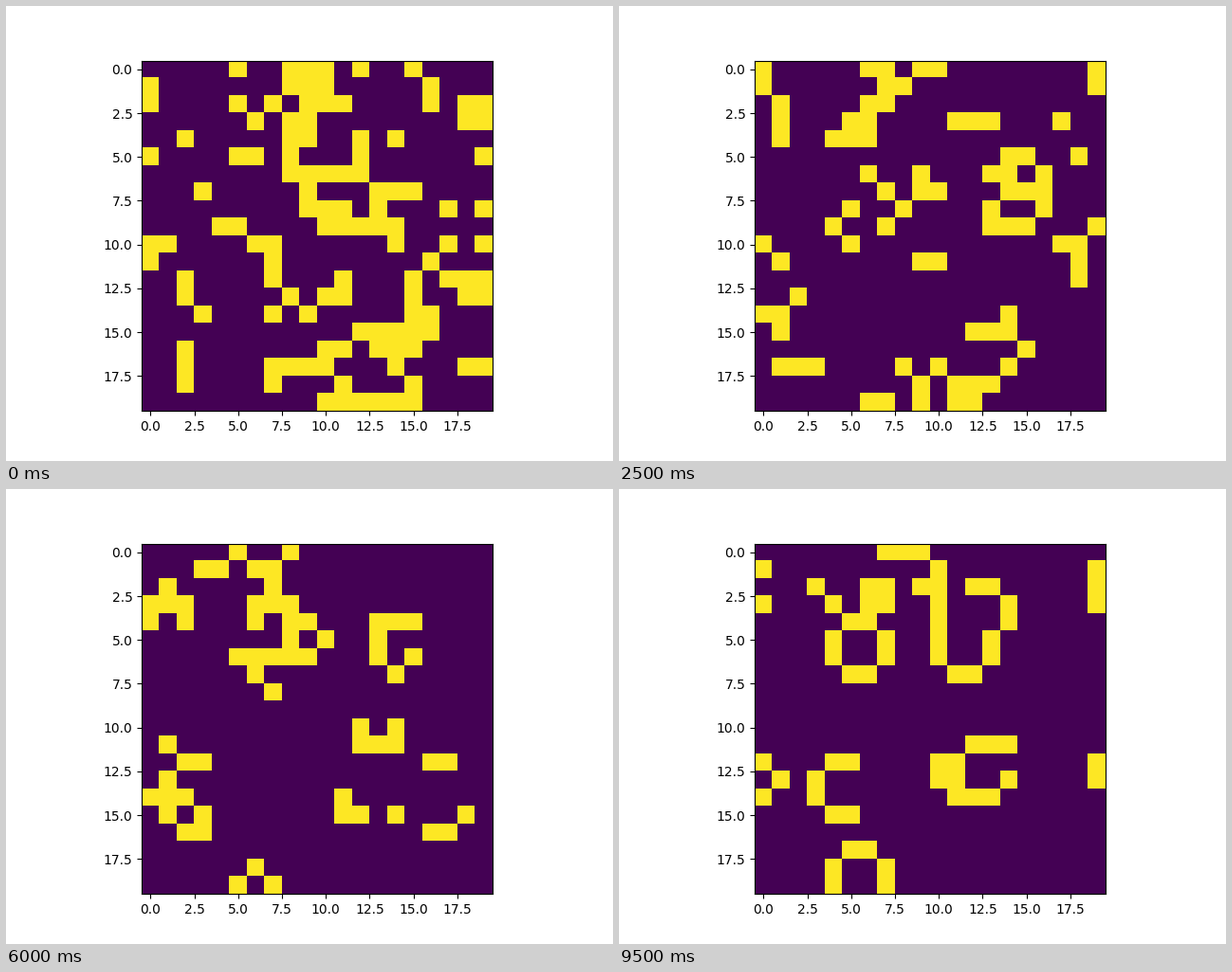
A matplotlib script that plays this animation: 640 px wide and 480 px high, repeating every 10 s.

```python
import numpy as np
import matplotlib.pyplot as plt
from matplotlib.animation import FuncAnimation

SIZE = 20
FRAMES = 20
INTERVAL = 500

# Starting colony: (width, height) of each block shape and the cells, counted
# row by row, that hold the top left corners of its copies.
COLONY = {
    (3, 2): [8],
    (2, 2): [58, 68, 258],
    (5, 1): [128, 190, 312],
    (3, 1): [49, 153, 169, 333, 390, 393],
    (1, 3): [322],
    (2, 1): [105, 184, 200, 206, 295, 330, 347, 349, 358],
    (1, 2): [20, 36, 92, 227, 242, 251, 255],
    (1, 1): [5, 12, 15, 45, 47, 66, 82, 94, 100, 108, 119, 143, 149, 173, 177,
             179, 214, 217, 219, 220, 236, 257, 268, 270, 283, 287, 289, 354,
             367, 371, 375],
}


def first_generation():
    grid = np.zeros((SIZE, SIZE), dtype=int)
    for (width, height), corners in COLONY.items():
        for corner in corners:
            row, col = divmod(corner, SIZE)
            grid[row:row + height, col:col + width] = 1
    return grid


def next_generation(grid):
    """Game of Life step on a board whose edges wrap around."""
    block = sum(np.roll(grid, (dy, dx), axis=(0, 1))
                for dy in (-1, 0, 1) for dx in (-1, 0, 1))
    return ((block == 3) | ((block == 4) & (grid == 1))).astype(int)


generations = [first_generation()]
while len(generations) < FRAMES:
    generations.append(next_generation(generations[-1]))

fig, ax = plt.subplots(figsize=(6.4, 4.8), dpi=100)
image = ax.imshow(generations[0], vmin=0, vmax=1, interpolation="nearest")


def update(frame):
    image.set_data(generations[frame])
    return [image]


anim = FuncAnimation(fig, update, frames=FRAMES, interval=INTERVAL,
                     repeat=True, repeat_delay=0)
plt.show()
```
